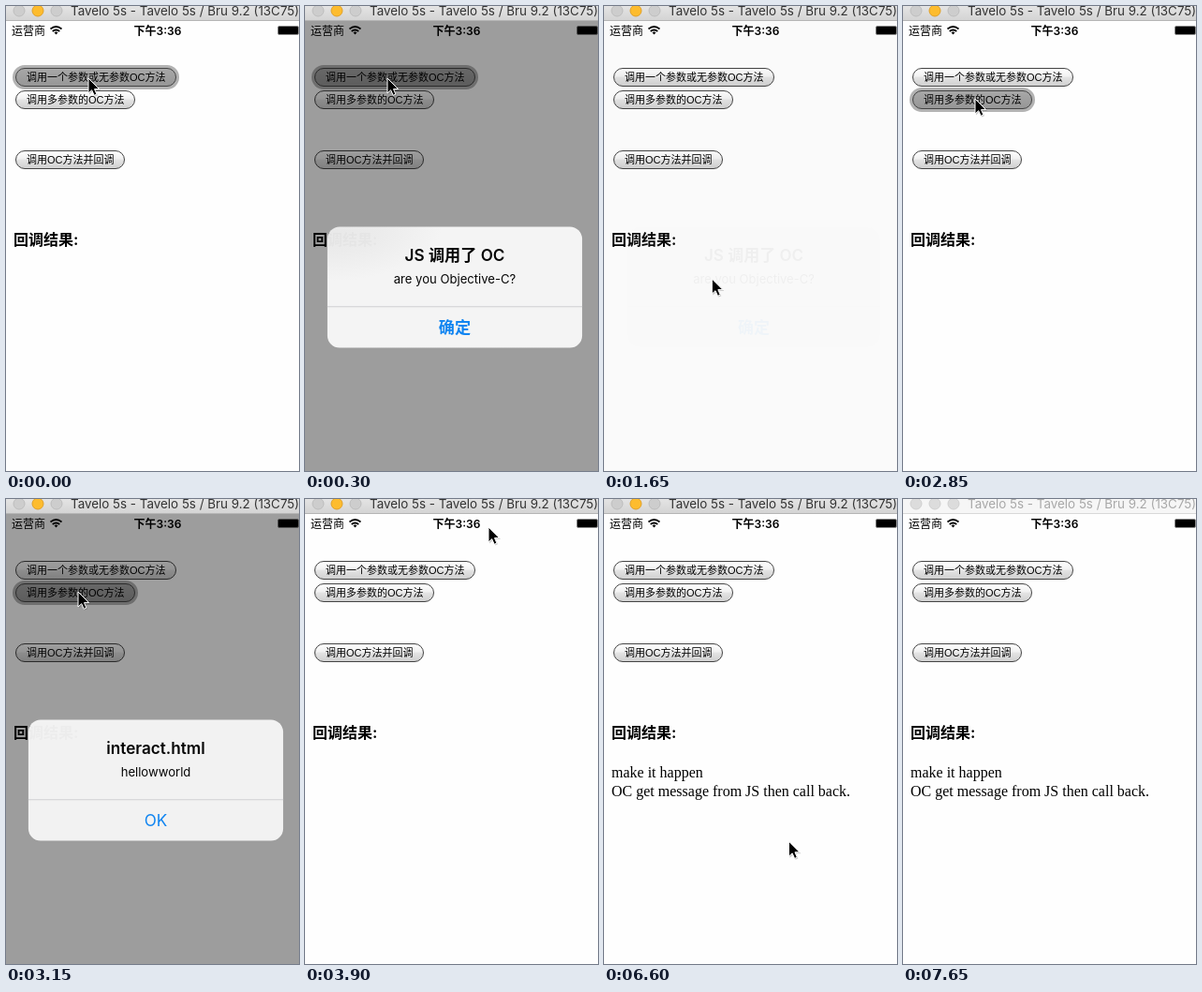
An HTML page that plays this animation: 313x496 px, repeating every 7750 ms.

```html
<!DOCTYPE html>
<html lang="zh-CN">
<head>
<meta charset="utf-8">
<style>
html, body { margin: 0; width: 100%; height: 100%; overflow: hidden; background: #fefefe; }
svg { display: block; width: 313px; height: 496px; }
text { font-family: Inter, "Noto Sans CJK SC", "Noto Sans CJK", sans-serif; }
.btn text { font: 11px "Liberation Sans", "Noto Sans CJK SC", "Noto Sans CJK", sans-serif; }
.result text { font: 16px "Liberation Serif", serif; }
.alert text { text-anchor: middle; font-size: 17px; }
.alert .head { font-weight: 600; }
.alert .msg { font-size: 13px; }
.alert .ok { fill: #0a84f5; }
</style>
</head>
<body>
<svg viewBox="0 0 313 496">
  <defs>
    <linearGradient id="up" x2="0" y2="1">
      <stop stop-color="#fff"/><stop offset=".45" stop-color="#f1f1f1"/>
      <stop offset=".5" stop-color="#e4e4e4"/><stop offset="1" stop-color="#cfcfcf"/>
    </linearGradient>
    <linearGradient id="down" x2="0" y2="1">
      <stop stop-color="#a8a8a8"/><stop offset="1" stop-color="#969696"/>
    </linearGradient>
    <linearGradient id="bar" x2="0" y2="1">
      <stop stop-color="#e4e4e4"/><stop offset="1" stop-color="#d3d3d3"/>
    </linearGradient>
    <radialGradient id="glass" cx="0" cy="0" r=".45">
      <stop stop-color="#ececec"/><stop offset=".5" stop-color="#f0f0f0"/><stop offset="1" stop-color="#f8f8f8"/>
    </radialGradient>
  </defs>
  <rect width="313" height="496" fill="#fefefe"/>

  <text x="6" y="30.5" font-size="12">运营商</text>
  <g fill="none" stroke="#000" stroke-width="1.7">
    <path d="M47.5 24.5q6-5 12 0M49.7 27q3.8-3 7.6 0"/>
    <path d="M51.5 28.3q2-1.5 4 0l-2 2.2z" fill="#000" stroke="none"/>
  </g>
  <text x="162" y="30.5" font-size="12" font-weight="600" text-anchor="middle">下午3:36</text>
  <rect x="290.5" y="21.5" width="22" height="9" rx="1.5" stroke="#8a8a8a"/>

  <g id="buttons"></g>
  <text x="8" y="254.5" font-size="16" font-weight="700">回调结果:</text>
  <g class="result" id="result">
    <text x="8" y="296.5">make it happen</text>
    <text x="8" y="316.5">OC get message from JS then call back.</text>
  </g>

  <rect id="dim" y="16" width="313" height="480"/>
  <g id="alerts"></g>

  <rect id="titleBar" width="313" height="16"/>
  <rect id="edge" y="15" width="313" height="1"/>
  <g id="lights"></g>
  <text id="title" x="69" y="10" font-size="13.4">Tavelo 5s - Tavelo 5s / Bru 9.2 (13C75)</text>

  <g id="cursor">
    <path d="M1 1.5V17.5l3.6-3.2 2.6 5.2 2.8-1.2-2.4-5.2H13z" opacity=".2"/>
    <path d="M0 0V16l3.7-3.3 2.5 5.6 2.7-1.2-2.4-5.5H11.6z" stroke="#fff"/>
  </g>
</svg>
<script>
const LOOP = 7750, STEP = 150, FADE = 375;
const $ = id => document.getElementById(id);
const set = (el, attrs) => { for (const k in attrs) el.setAttribute(k, attrs[k]); };
const clamp = v => Math.min(1, Math.max(0, v));
const easeOut = u => 1 - (1 - u) ** 2;
const smooth = u => u * u * (3 - 2 * u);

const buttons = [
  { y: 66, w: 172, label: '调用一个参数或无参数OC方法', press: 0, release: 450 },
  { y: 90, w: 128, label: '调用多参数的OC方法', press: 2850, release: 3400 },
  { y: 154, w: 117, label: '调用OC方法并回调', press: 4050, release: 4200 },
];
const alerts = [
  { head: 'JS 调用了 OC', msg: 'are you Objective-C?', ok: '确定', fill: 'url(#glass)', weight: 600, open: 0, close: 1350 },
  { head: 'interact.html', msg: 'hellowworld', ok: 'OK', fill: '#f6f6f6', weight: 400, open: 2850, close: 3400 },
];
// Where the pointer goes next, and when it travels.
const moves = [
  { from: 450, to: 1200, x: 157, y: 347 },
  { from: 1450, to: 2100, x: 77, y: 99 },
  { from: 3150, to: 3450, x: 157, y: 345 },
  { from: 3600, to: 3900, x: 196, y: 30 },
  { from: 3900, to: 4050, x: 87, y: 167 },
  { from: 5850, to: 6150, x: 58, y: 220 },
  { from: 6150, to: 6900, x: 224, y: 444 },
];

$('buttons').innerHTML = buttons.map(({ y, w, label }) => `<g class="btn">
  <rect x="7" y="${y - 3}" width="${w + 6}" height="26" rx="13" fill="#b2b2b2"/>
  <rect x="10.5" y="${y + .5}" width="${w - 1}" height="19" rx="9.5" stroke="#444"/>
  <text x="22" y="${y + 14}">${label}</text></g>`).join('');
$('alerts').innerHTML = alerts.map(({ head, msg, ok, fill, weight }) => `<g class="alert">
  <rect x="25" y="236" width="270" height="128" rx="13" fill="${fill}"/>
  <path d="M25 320.5H295" stroke="#d2d2d4"/>
  <text class="head" x="160" y="272">${head}</text>
  <text class="msg" x="160" y="296">${msg}</text>
  <text class="ok" x="160" y="349" font-weight="${weight}">${ok}</text></g>`).join('');
$('lights').innerHTML = [14, 34, 54].map(x => `<circle cx="${x}" cy="5" r="6"/>`).join('');

function pointerAt(t) {
  let x = 88, y = 77;
  for (const m of moves) {
    const u = clamp((t - m.from) / (m.to - m.from));
    x += (m.x - x) * easeOut(u);
    y += (m.y - y) * smooth(u);
  }
  return [x, y];
}

function alertLevel({ open, close }, t) {
  return t < close ? easeOut(clamp((t - open) / FADE)) : 1 - easeOut(clamp((t - close) / FADE));
}

function draw(time) {
  const t = Math.floor(time / STEP) * STEP;

  buttons.forEach(({ press, release }, i) => {
    const [ring, face] = $('buttons').children[i].children;
    const on = t >= press && t < release;
    set(ring, { opacity: on ? 1 : 0 });
    set(face, { fill: on ? 'url(#down)' : 'url(#up)' });
  });

  let shade = 0;
  alerts.forEach((alert, i) => {
    const level = alertLevel(alert, t);
    const scale = t < alert.close ? 1.2 - .2 * level : 1;
    set($('alerts').children[i], {
      opacity: level,
      transform: `translate(160 300) scale(${scale}) translate(-160 -300)`,
    });
    shade += level;
  });
  set($('dim'), { opacity: .4 * shade });
  set($('result'), { opacity: t >= 5400 ? 1 : 0 });
  set($('cursor'), { transform: `translate(${pointerAt(t)})`, opacity: t < 7050 ? 1 : 0 });

  const active = time < 7650;
  set($('titleBar'), { fill: active ? 'url(#bar)' : '#f6f6f6' });
  set($('edge'), { fill: active ? '#b5b5b5' : '#d8d8d8' });
  set($('title'), { fill: active ? '#333' : '#a8a8a8' });
  [...$('lights').children].forEach((light, i) => set(light, active && i === 1
    ? { fill: '#fdbc2e', stroke: '#e0a028' }
    : { fill: active ? '#cdcdcd' : '#dcdcdc', stroke: active ? '#bdbdbd' : '#d0d0d0' }));
}

const start = performance.now();
(function loop() {
  draw((performance.now() - start) % LOOP);
  requestAnimationFrame(loop);
})();
</script>
</body>
</html>
```
